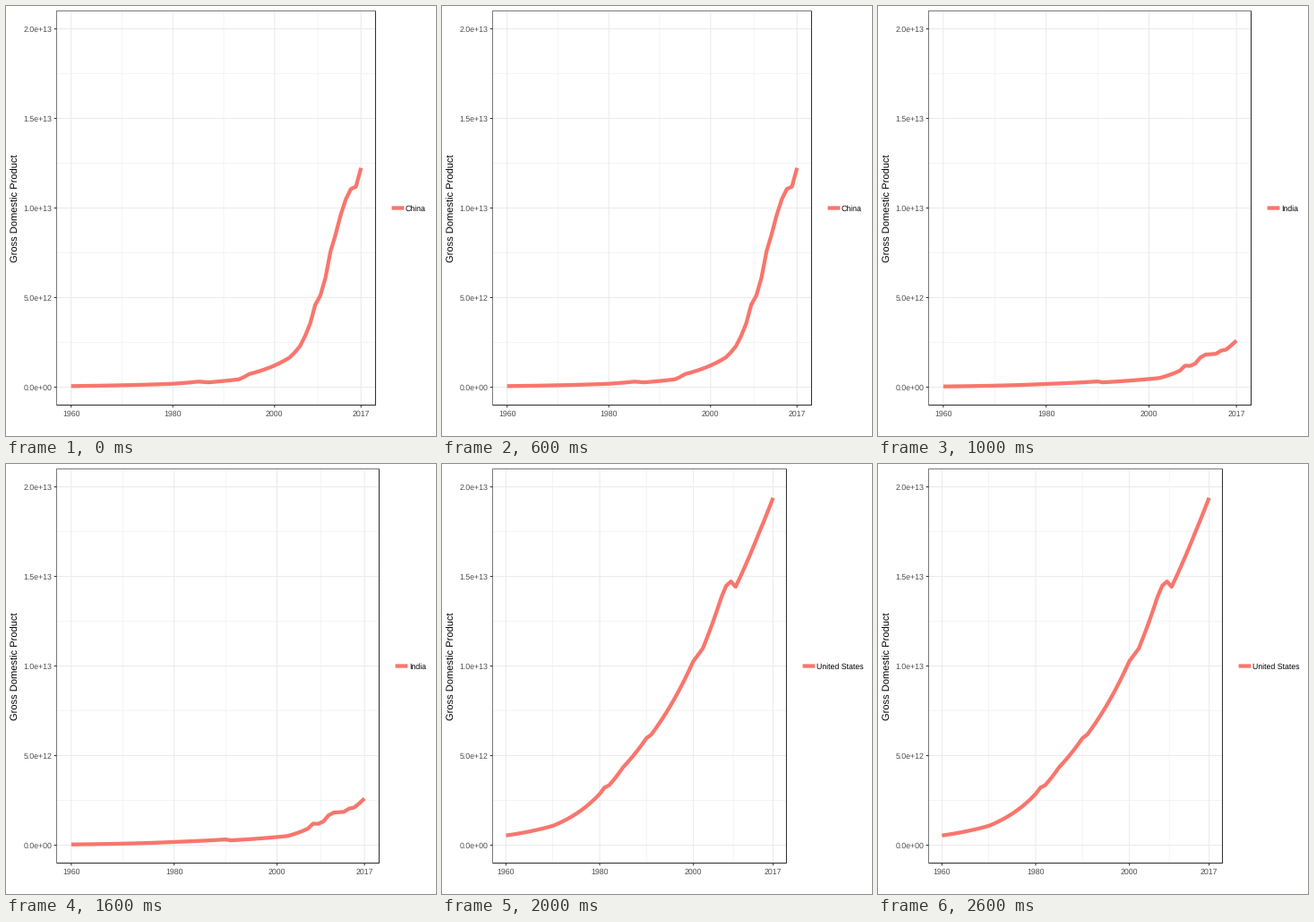
Recreate the animation shown at these times as a matplotlib script. Size 480x480 px, loop 3 s.

```python
import matplotlib.pyplot as plt
import numpy as np
from matplotlib.animation import FuncAnimation

SIZE, DPI = 480, 72  # at 72 dpi one point is one pixel
LEFT, TOP, BOTTOM = 56.5, 5.5, 445.5
FIRST, LAST = 1960, 2017
TOP_VALUE = 2000  # values are in units of 1e10 dollars
MIDDLE = (TOP + BOTTOM) / 2

CORAL, GRID = "#F8766D", "#EBEBEB"
FRAME, TICK_TEXT = "#333333", "#4D4D4D"
SMALL = 8.8

plt.rcParams.update({
    "font.family": "Liberation Sans",
    "text.hinting": "none",
    "lines.solid_capstyle": "butt",
    "lines.solid_joinstyle": "round",
})

# name, right edge of the panel, turning points of the curve
COUNTRIES = [
    ("China", 412.5, {
        1960: 6, 1980: 19, 1985: 31, 1987: 27, 1993: 44, 1995: 73, 2000: 121,
        2003: 166, 2005: 229, 2007: 355, 2008: 460, 2009: 511, 2010: 610,
        2011: 757, 2013: 961, 2014: 1048, 2015: 1106, 2016: 1119, 2017: 1224}),
    ("India", 416.5, {
        1960: 4, 1980: 18, 1990: 32, 1991: 27, 2002: 51, 2006: 92, 2007: 120,
        2008: 119, 2009: 132, 2010: 166, 2011: 182, 2013: 186, 2014: 204,
        2015: 210, 2017: 260}),
    ("United States", 384.5, {
        1960: 54, 1970: 108, 1980: 286, 1981: 321, 1982: 334, 1985: 435,
        1990: 598, 1991: 617, 2000: 1028, 2002: 1098, 2006: 1386, 2007: 1448,
        2008: 1472, 2009: 1442, 2014: 1743, 2017: 1939}),
]

fig = plt.figure(figsize=(SIZE / DPI, SIZE / DPI), dpi=DPI, facecolor="white")
ax = fig.add_axes([0, 0, 1, 1])


def to_x(year, right):
    """Year to pixels, with 5% padding on both sides."""
    pad = (right - LEFT) / 22
    return LEFT + pad + (year - FIRST) / (LAST - FIRST) * (right - LEFT - 2 * pad)


def to_y(value):
    pad = (BOTTOM - TOP) / 22
    return BOTTOM - pad - value / TOP_VALUE * (BOTTOM - TOP - 2 * pad)


def growth(points):
    """Yearly values at a constant growth rate between turning points."""
    years = np.arange(FIRST, LAST + 1)
    logs = np.log(list(points.values()))
    return years, np.exp(np.interp(years, list(points), logs))


def line(xs, ys, color, width):
    ax.plot(xs, ys, color=color, lw=width, snap=False)


def draw_grid(right):
    for width, years, values in (
        (0.53, (1970, 1990, 2008.5), range(250, TOP_VALUE, 500)),
        (1.07, (1960, 1980, 2000, 2017), range(0, TOP_VALUE + 1, 500)),
    ):
        for value in values:
            line([LEFT, right], [to_y(value)] * 2, GRID, width)
        for year in years:
            line([to_x(year, right)] * 2, [TOP, BOTTOM], GRID, width)


def draw_axes(right):
    # the upper left edges are half clipped, so they look thinner
    line([LEFT, LEFT, right], [BOTTOM, TOP, TOP], FRAME, 0.65)
    line([LEFT, right, right], [BOTTOM, BOTTOM, TOP], FRAME, 1.07)
    for value in range(0, TOP_VALUE + 1, 500):
        y = to_y(value)
        line([LEFT - 2.75, LEFT], [y, y], FRAME, 1.07)
        ax.text(51.3, y + 3.2, f"{value * 1e10:.1e}", size=SMALL,
                color=TICK_TEXT, ha="right", va="baseline")
    for year in (1960, 1980, 2000, 2017):
        x = to_x(year, right)
        line([x, x], [BOTTOM, BOTTOM + 2.75], FRAME, 1.07)
        ax.text(x, 458, str(year), size=SMALL, color=TICK_TEXT,
                ha="center", va="baseline")
    ax.text(13.4, MIDDLE, "Gross Domestic Product", size=11.1, rotation=90,
            rotation_mode="anchor", ha="center", va="baseline")


def draw_legend(name, right):
    line([right + 18.1, right + 31.9], [MIDDLE] * 2, CORAL, 4.27)
    ax.text(right + 33.5, MIDDLE + 3.2, name, size=SMALL, va="baseline")


def draw(i):
    name, right, points = COUNTRIES[i]
    ax.clear()
    ax.set(xlim=(0, SIZE), ylim=(SIZE, 0))
    ax.axis("off")
    draw_grid(right)
    years, values = growth(points)
    line(to_x(years, right), to_y(values), CORAL, 4.27)
    draw_axes(right)
    draw_legend(name, right)
    return []


anim = FuncAnimation(fig, draw, frames=len(COUNTRIES), interval=1000,
                     init_func=lambda: [], repeat=True, repeat_delay=0)
plt.show()
```
